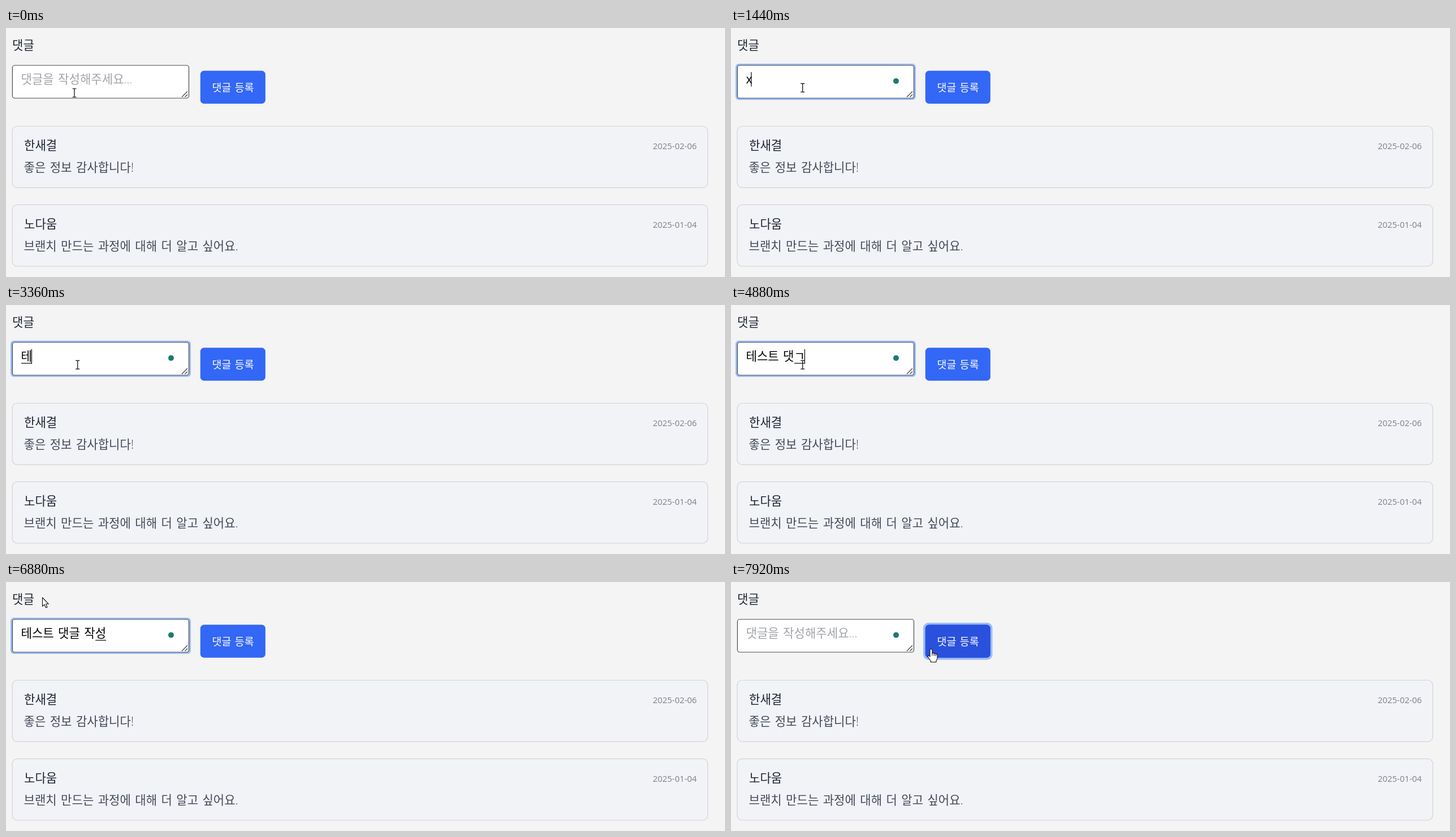
Write an HTML page that moves like this. It is 1272 by 440 pixels and loops after 8 s.

```html
<!DOCTYPE html>
<html lang="ko">
<head>
<meta charset="utf-8">
<title>댓글</title>
<style>
  html, body { margin: 0; width: 100%; height: 100%; overflow: hidden; background: #f4f4f4; }
  svg { display: block; width: 1272px; height: 440px; }
  text {
    font: 300 21.1px "Open Sans", "Noto Sans CJK KR", "Noto Sans CJK", sans-serif;
    word-spacing: .09em; white-space: pre;
  }
  .bold { font-weight: 500; fill: #1c2330; }
  .body { fill: #424956; }
  .date { font-size: 14.9px; font-weight: 400; fill: #7b7f88; text-anchor: end; }
  .latin { font-weight: 400; letter-spacing: -1.1px; }
  .card { fill: #f2f3f7; stroke: #d2d4d9; stroke-width: 1.2; }
  .ring { fill: #9bbcf5; }
  .line { fill: none; stroke: #000; stroke-width: 1.2; }
  .pointer { fill: #fff; stroke: #111; stroke-width: 1.1; stroke-linejoin: round; }
</style>
</head>
<body>
<svg viewBox="0 0 1272 440">
  <text class="bold" x="11" y="38">댓글</text>

  <rect id="inputRing" class="ring" x="8" y="63" width="319" height="64" rx="6"/>
  <rect x="11.4" y="66" width="312.1" height="58" rx="4" fill="#fff" stroke="#4a4d55" stroke-width="1.2"/>
  <path d="M311 122L321 112M316.5 122L321 117.5" stroke="#444" stroke-width="1.3"/>
  <text id="hint" x="26.5" y="98" fill="#a0a3a8">댓글을 작성해주세요...</text>
  <text id="typed" x="26.5" y="98"></text>
  <path id="underline" class="line"/>
  <path id="caret" class="line"/>
  <circle id="dot" cx="292" cy="93.7" r="5" fill="#1d7a72"/>

  <rect id="buttonRing" class="ring" x="340" y="72" width="122.5" height="65.5" rx="9"/>
  <rect x="343.8" y="75.5" width="115.1" height="58.2" rx="6.5" fill="#3367f5"/>
  <rect id="hover" x="343.8" y="75.5" width="115.1" height="58.2" rx="6.5" fill="#2a51de"/>
  <text x="364.5" y="111.8" fill="#fff" style="font-size:18.4px">댓글 등록</text>

  <rect class="card" x="11" y="173.5" width="1230.5" height="108.7" rx="9"/>
  <text class="bold" x="32" y="215.3">한새결</text>
  <text class="body" x="31.5" y="254.4">좋은 정보 감사합니다!</text>
  <text class="date" x="1222" y="214.2">2025-02-06</text>

  <rect class="card" x="11" y="312.3" width="1230.5" height="108.7" rx="9"/>
  <text class="bold" x="32" y="354.1">노다움</text>
  <text class="body" x="31.5" y="393.2">브랜치 만드는 과정에 대해 더 알고 싶어요.</text>
  <text class="date" x="1222" y="353">2025-01-04</text>

  <path id="beam" class="line" d="M-3.5-7.5H-1Q0-7.5 0-6.5Q0-7.5 1-7.5H3.5M0-6.5V6.5M-3.5 7.5H-1Q0 7.5 0 6.5Q0 7.5 1 7.5H3.5"/>
  <path id="arrow" class="pointer" d="M.5.5V16L4 12.8L6.5 18.5L9 17.4L6.6 11.8H11.3Z"/>
  <path id="hand" class="pointer" d="M-2 1.5Q-2-.5 0-.5T2 1.5V7Q4 5.5 5.3 7.5Q7 6.3 8.2 8.3Q10.8 7.5 11 10V15Q11 18 9 20V22.5H-.5V20.5Q-2 19-5.5 13.5Q-6.5 11.5-4.8 11Q-3.5 11-2 13ZM2 7V11M5.3 7.5V11.5M8.2 8.3V12"/>
</svg>
<script>
const $ = id => document.getElementById(id);
const LOOP = 8000;

// Keystrokes: time and resulting value
const keys = [
  [0, ""], [1440, "x"], [2000, "xp"], [2400, "xpt"], [2560, "xp"], [2800, "x"], [2960, ""],
  [3360, "테"], [3440, "텟"], [3680, "테스"], [3840, "테슽"], [3920, "테스트"], [4080, "테스트 "],
  [4400, "테스트 ㄷ"], [4560, "테스트 댓"], [4880, "테스트 댓ㄱ"], [4960, "테스트 댓그"],
  [5040, "테스트 댓글"], [5360, "테스트 댓글 "], [5520, "테스트 댓글 ㅈ"], [5680, "테스트 댓글 자"],
  [5920, "테스트 댓글 잓"], [6000, "테스트 댓글 작서"], [6080, "테스트 댓글 작성"], [7680, ""]
];
// Pointer path: time, x, y
const path = [[0, 121, 114.5], [480, 126.7, 105.7], [6875, 126.7, 105.7], [6880, 64, 27],
  [7040, 64, 27], [7440, 354, 119], [LOOP, 354, 119]];

const ramp = (t, a, b) => Math.min(1, Math.max(0, (t - a) / (b - a)));
const ease = p => p * p * (3 - 2 * p);
const fade = (id, value) => $(id).setAttribute("opacity", +value);

function pointerAt(t) {
  const i = path.findIndex(p => p[0] > t);
  const [t0, x0, y0] = path[i - 1], [t1, x1, y1] = path[i];
  const p = ease(ramp(t, t0, t1));
  return [x0 + (x1 - x0) * p, y0 + (y1 - y0) * p];
}

function drawPointer(t) {
  const [x, y] = pointerAt(t);
  const shape = x > 343 && y > 75 ? "hand" : x > 11 && x < 324 && y > 66 && y < 124 ? "beam" : "arrow";
  for (const id of ["beam", "arrow", "hand"]) {
    fade(id, id === shape);
    $(id).setAttribute("transform", `translate(${x} ${y})`);
  }
}

function drawInput(t) {
  const value = keys.findLast(k => k[0] <= t)[1];
  const typed = $("typed");
  typed.textContent = value;
  typed.classList.toggle("latin", /[a-z]/.test(value));
  const start = 26.5, n = value.length;
  const end = start + (n ? typed.getComputedTextLength() : 0);
  $("caret").setAttribute("d", `M${end - .5} 78V103.5`);
  fade("caret", t >= 1120 && t < 6360);

  const composing = /[ㄱ-힣]$/.test(value) && t < 7600;
  const from = start + (n > 1 ? typed.getSubStringLength(0, n - 1) : 0);
  $("underline").setAttribute("d", composing ? `M${from + .5} 103H${end}` : "");
  fade("hint", !value);
  fade("dot", t >= 1440);
}

function draw() {
  const t = performance.now() % LOOP;
  drawInput(t);
  drawPointer(t);
  fade("inputRing", ramp(t, 1080, 1200) - ramp(t, 7590, 7700));
  fade("hover", ramp(t, 7400, 7560));
  fade("buttonRing", ramp(t, 7590, 7700));
  requestAnimationFrame(draw);
}
draw();
</script>
</body>
</html>
```
